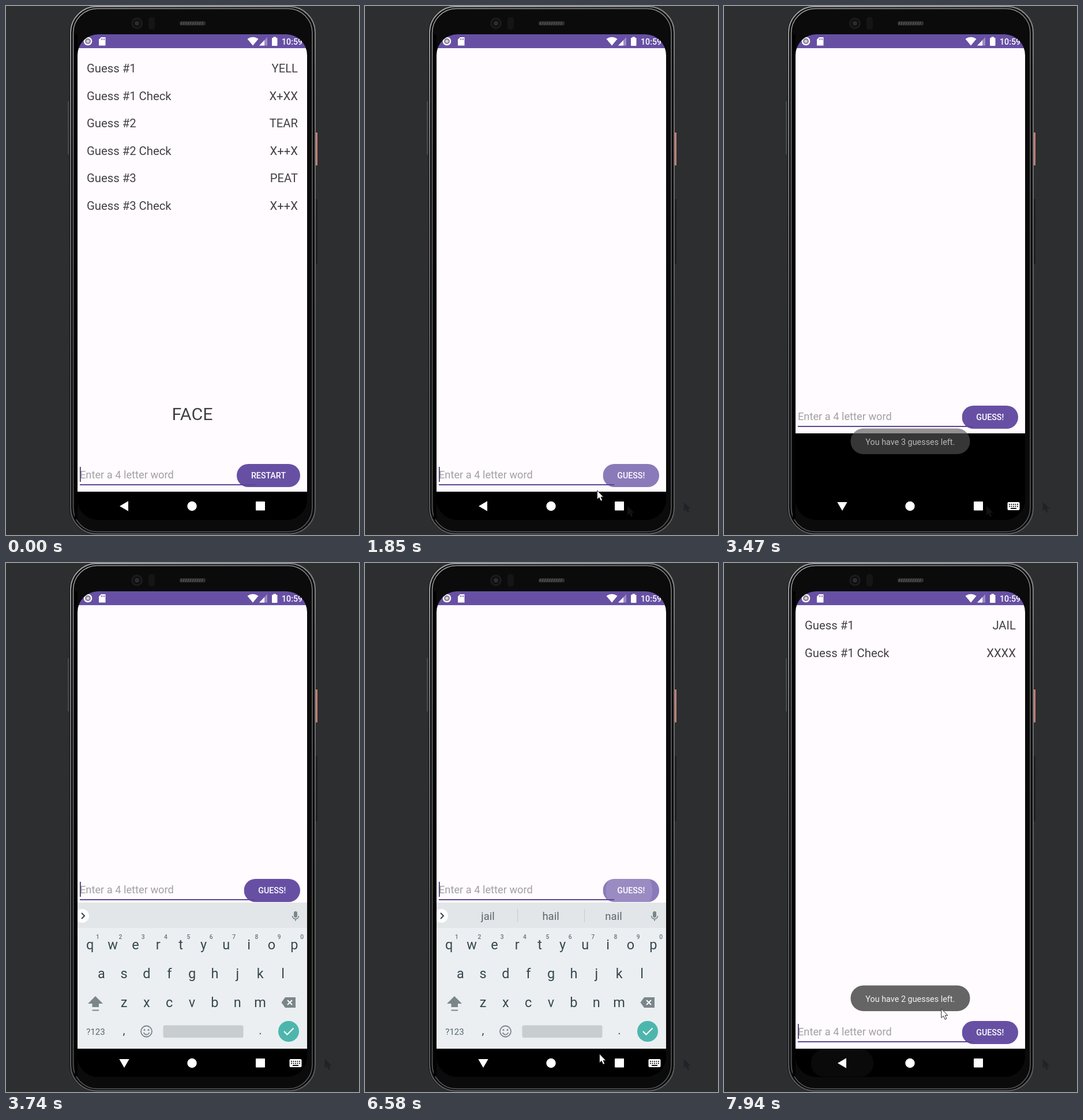
An HTML page with a canvas that plays this animation: 612 by 916 pixels, repeating every 8000 ms.

```html
<!DOCTYPE html>
<html lang="en">
<head>
<meta charset="utf-8">
<title>Word guessing game</title>
<style>
html, body { margin: 0; width: 100%; height: 100%; overflow: hidden; background: #2d2e30; }
canvas { display: block; }
</style>
</head>
<body>
<canvas id="stage" width="612" height="916"></canvas>
<script>
const c = document.getElementById('stage').getContext('2d');
const LOOP = 8000, PAN = 246, RESTART = 1700, SUBMIT = 6460;
const PURPLE = '#6750a4', INK = '#424045', KEY = '#37474f', GREY = '#7b868b';

const ramp = (t, start, length) => Math.min(1, Math.max(0, (t - start) / length));
const decel = p => 1 - (1 - p) ** 2;
const white = alpha => `rgba(255,255,255,${alpha})`;

function rect(x, y, w, h, color) { c.fillStyle = color; c.fillRect(x, y, w, h); }
function round(x, y, w, h, r, color) {
  c.beginPath(); c.roundRect(x, y, w, h, r); c.fillStyle = color; c.fill();
}
function frame(x, y, w, h, r, color, width) {
  c.beginPath(); c.roundRect(x, y, w, h, r);
  c.strokeStyle = color; c.lineWidth = width; c.stroke();
}
function arc(x, y, r, from, to, color, width) {
  c.beginPath(); c.arc(x, y, r, from, to);
  c.strokeStyle = color; c.lineWidth = width; c.stroke();
}
function disc(x, y, r, color) {
  c.beginPath(); c.arc(x, y, r, 0, 7); c.fillStyle = color; c.fill();
}
function poly(color, ...p) {
  c.beginPath();
  for (let i = 0; i < p.length; i += 2) c.lineTo(p[i], p[i + 1]);
  c.closePath(); c.fillStyle = color; c.fill();
}
function line(color, width, ...p) {
  c.beginPath();
  for (let i = 0; i < p.length; i += 2) c.lineTo(p[i], p[i + 1]);
  c.strokeStyle = color; c.lineWidth = width; c.stroke();
}
function triangle(x, y, r, turn) {
  const corners = [0, 1, 2].map(i => turn + i * Math.PI * 2 / 3);
  poly('#fff', ...corners.flatMap(a => [x + r * Math.cos(a), y + r * Math.sin(a)]));
}
function text(s, x, y, size, color, align = 'left', weight = 400) {
  c.font = `${weight} ${size}px Roboto, sans-serif`;
  c.textAlign = align; c.fillStyle = color; c.fillText(s, x, y);
}
function clipped(x, y, w, h, r, paint) {
  c.save(); c.beginPath(); c.roundRect(x, y, w, h, r); c.clip(); paint(); c.restore();
}

const metal = c.createLinearGradient(110, 0, 340, 600);
metal.addColorStop(0, '#a2a3a4');
metal.addColorStop(.4, '#77787a');
metal.addColorStop(1, '#5c5d5f');

function phone() {
  rect(0, 0, 612, 916, '#2d2e30');
  rect(107, 165, 2, 92, '#48494b');
  rect(537, 219, 3, 57, '#c08175');
  round(536, 334, 4, 113, 2, '#1f2022');
  round(110, 0, 427, 915, 46, '#0b0b0c');
  frame(112, 1, 424, 913, 45, metal, 2);
  frame(116.5, 4.5, 414.5, 906, 42, metal, 1.5);
  rect(119, 49, 5, 840, '#020202');
  disc(227, 30, 10, '#1b1b1c');
  disc(227, 30, 6.5, '#0c0c0d');
  disc(227, 30, 4, '#2b2c30');
  round(247, 19, 11, 22, 5, '#151516');
  round(301, 26.5, 45, 7, 3, '#303031');
  for (let x = 303; x < 343; x += 4) line('#656566', 1, x, 32.5, x + 2, 27.5);
}

function statusBar() {
  rect(124, 49, 398, 24, PURPLE);
  disc(142, 61, 7.3, '#fff');
  disc(142, 61, 5, '#8a8299');
  disc(142, 61, 2.6, '#d5d2da');
  poly('#fff', 165, 54, 172.5, 54, 172.5, 68.5, 161, 68.5, 161, 58);
  for (let i = 0; i < 3; i++) rect(165 + i * 2.5, 56, 1, 3, PURPLE);
  c.beginPath(); c.moveTo(428, 68.5); c.lineTo(418.5, 57);
  c.quadraticCurveTo(428, 50.5, 437.5, 57); c.fillStyle = '#fff'; c.fill();
  poly(white(.35), 439, 68.5, 453, 54, 453, 68.5);
  poly('#fff', 439, 68.5, 448, 59.3, 448, 68.5);
  round(461, 55, 9.5, 14, 1, '#fff');
  rect(463.5, 53.5, 4.5, 2, '#fff');
  text('10:59', 478, 67, 14.2, '#fff', 'left', 500);
}

// The word is typed letter by letter; every edit restarts the caret's blink
const typing = [[4620, 'j'], [4760, 'ja'], [4890, 'jai'], [5090, 'jail'], [SUBMIT, '']];
const edits = [-240, RESTART, ...typing.map(([at]) => at)];
const typed = t => typing.findLast(([at]) => at <= t)?.[1] ?? '';
const caretOn = t => (t - edits.findLast(at => at <= t)) % 1000 < 500;

function list(words) {
  words.forEach((word, i) => {
    const y = 115 + i * 47.6;
    text(`Guess #${1 + (i >> 1)}${i % 2 ? ' Check' : ''}`, 140, y, 20.27, INK);
    text(word, 506, y, 20.27, INK, 'right');
  });
}

function field(t) {
  const word = typed(t);
  let caret = 128;
  if (word) {
    text(word, 128, 818, 18.24, '#1c1b1f');
    const w = c.measureText(word).width;
    rect(128, 820, w, 1, '#1c1b1f');
    caret += w - .5;
  } else text('Enter a 4 letter word', 128, 818, 18.24, '#a2a0a4');
  if (caretOn(t)) rect(caret, 798, 1.7, 26, '#44386a');
}

// A press lights the button, then fades out
const press = (t, start, end) => ramp(t, start, 70) * (1 - ramp(t, end, 200));

function button(t, label, left) {
  const lit = press(t, 1560, 2540) + press(t, 6390, 6680);
  clipped(left, 793, 510 - left, 40, 20, () => {
    rect(left, 793, 110, 40, PURPLE);
    rect(left, 793, 110, 40, white(.24 * lit));
    if (t > 6480) disc(458, 813, (t - 6480) * .4, white(.13 * lit));
  });
  rect(128, 828, 304, 2, '#5b4790');
  text(label, (left + 510) / 2, 818, 14.25, '#fff', 'center', 500);
}

function content(t) {
  const ended = t < RESTART;
  rect(124, 73, 398, 768, '#fffbfe');
  if (ended) {
    list(['YELL', 'X+XX', 'TEAR', 'X++X', 'PEAT', 'X++X']);
    text('FACE', 323, 717, 30.4, INK, 'center');
  } else if (t >= SUBMIT) list(['JAIL', 'XXXX']);
  field(t);
  if (ended) button(t, 'RESTART', 400); else button(t, 'GUESS!', 412.5);
}

const hints = { ja: 'ja jam jacket', jai: 'jai jail hair', jail: 'jail hail nail' };

function suggestions(t) {
  const words = hints[typed(Math.min(t, SUBMIT - 1))];
  if (!words || t > 7560) return;
  words.split(' ').forEach((w, i) => {
    text(w, 213 + i * 109, 618, 18.5, '#5b666b', 'center');
    if (i) rect(148 + i * 116, 599, 1, 23, '#c6cbcd');
  });
}

function keyboard(t) {
  rect(124, 588, 398, 45, '#e2e6e8');
  rect(124, 632, 398, 209, '#ebeff1');
  disc(132, 611, 12, '#fff');
  line('#37424a', 2, 131, 606, 136, 611, 131, 616);
  suggestions(t);
  round(499, 603, 6, 11, 3, GREY);
  arc(502, 611, 5.5, 0, Math.PI, GREY, 1.5);
  rect(501.2, 616, 1.6, 4, GREY);

  const keys = (s, x, y, size = 23.5, color = KEY, weight = 400) =>
    [...s].forEach((k, i) => text(k, x + i * 39.35, y, size, color, 'center', weight));
  keys('qwertyuiop', 145.7, 669);
  keys('asdfghjkl', 165.3, 719);
  keys('zxcvbnm', 204.5, 769);
  keys('1234567890', 159, 650.5, 10.3, '#66747b', 500);

  poly(GREY, 155, 750, 168, 763, 142, 763);
  rect(149.5, 762, 11.5, 7, GREY);
  rect(149.5, 773.5, 11.5, 2, GREY);
  poly(GREY, 477.5, 761, 484, 752, 502, 752, 502, 770, 484, 770);
  line('#fff', 2, 488, 757, 496, 765);
  line('#fff', 2, 496, 757, 488, 765);
  text('?123', 155.5, 816.5, 15, '#5a676d', 'center');
  text(',', 204.5, 816, 20, KEY, 'center');
  text('.', 441, 816, 20, KEY, 'center');
  arc(243.5, 811, 9.5, 0, 7, GREY, 1.8);
  arc(243.5, 811.5, 5, .3, 2.84, GREY, 1.8);
  disc(240, 808.5, 1.5, GREY);
  disc(247, 808.5, 1.5, GREY);
  round(272.5, 800.5, 139, 21.5, 3, '#c8cdd0');
  disc(490, 811, 18, '#4db6ac');
  line('#fff', 2, 482, 811, 487.5, 816.5, 498.5, 805.5);
}

function navBar(t) {
  rect(124, 841, 398, 49, '#000');
  const glow = ramp(t, 7340, 140) * (.17 - .13 * ramp(t, 7610, 330));
  round(151, 842.5, 108, 47, 22, white(glow));
  if (t >= 3410 && t < 7440) {
    triangle(205, 864, 10, Math.PI / 2);
    round(491.5, 859, 21, 14, 2, '#fff');
    for (let i = 0; i < 10; i++) rect(494 + i % 5 * 3.5, 862 + (i > 4) * 3.5, 1.8, 1.8, '#000');
    rect(497, 869, 10, 1.8, '#000');
  } else triangle(207, 866, 10, Math.PI);
  disc(322.5, 866, 8.2, '#fff');
  round(433, 858, 16, 15.5, 1, '#fff');
}

function toast(t) {
  c.globalAlpha = ramp(t, 2540, 200) * (1 - ramp(t, 3400, 240)) + ramp(t, 6700, 200);
  round(219.5, 731.5, 207, 44.5, 22, 'rgba(85,85,85,.9)');
  text(`You have ${t < SUBMIT ? 3 : 2} guesses left.`, 322.8, 760, 14.4, white(.92), 'center');
  c.globalAlpha = 1;
}

function arrow(x, y, fill, edge) {
  c.save(); c.translate(x, y);
  poly(fill, 0, 0, 0, 15.5, 3.6, 12.3, 6.3, 18.3, 9, 17, 6.5, 11.3, 11, 11.3);
  c.strokeStyle = edge; c.lineWidth = 1; c.stroke();
  c.restore();
}

// Pointer stops as [time, x, y]; it hides while the keyboard is in use
const visits = [
  [[70, 520, 912], [500, 455, 815], [890, 455, 815], [1060, 580, 883],
   [1370, 458, 815], [1640, 458, 815], [1850, 403, 839], [2050, 300, 811], [3380, 300, 811]],
  [[5800, 528, 716], [6200, 458, 567], [6470, 458, 567], [6580, 407, 850],
   [7000, 212, 866], [7400, 212, 866], [7610, 517, 784], [7940, 377, 772], [LOOP, 365, 772]]
];
function pointer(t) {
  for (const stops of visits) {
    const i = stops.findIndex(s => s[0] > t);
    if (i < 1) continue;
    const [[t0, x0, y0], [t1, x1, y1]] = stops.slice(i - 1);
    const f = ramp(t, t0, t1 - t0);
    arrow(x0 + (x1 - x0) * f, y0 + (y1 - y0) * f, '#fff', '#222');
  }
}

function draw(t) {
  const pan = Math.round(PAN * (decel(ramp(t, 3413, 250)) - decel(ramp(t, 7595, 250))));
  const hidden = Math.max(1 - ramp(t, 3500, 140), ramp(t, 7590, 160));
  phone();
  clipped(124, 49, 398, 841, 36, () => {
    rect(124, 49, 398, 841, '#000');
    clipped(124, 73, 398, 768, 0, () => { c.translate(0, -pan); content(t); });
    statusBar();
    navBar(t);
    clipped(124, 73, 398, 770, 0, () => {
      c.globalAlpha = 1 - hidden ** 2;
      c.translate(0, 16 * hidden);
      keyboard(t);
    });
    toast(t);
  });
  // Faint trails left by the pointer
  if (t > 1060) arrow(553, 859, '#202228', '#25272c');
  if (t > 1740 && t < 3560) arrow(455, 866, '#111318', '#0c0d10');
  pointer(t);
}

function tick() {
  draw(performance.now() % LOOP);
  requestAnimationFrame(tick);
}
tick();
</script>
</body>
</html>
```
